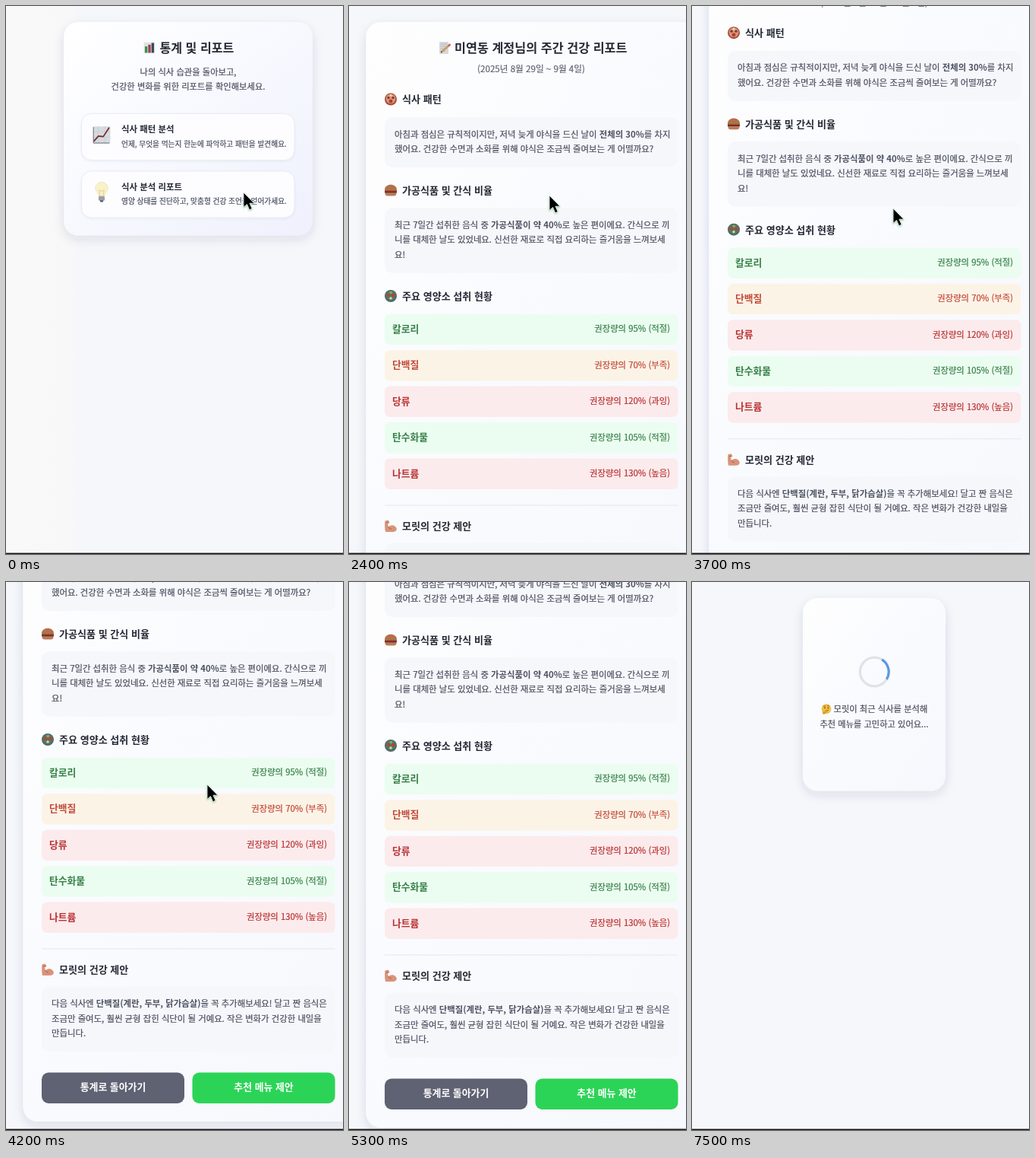
These frames come from a looping animation (444 by 720 pixels, 7.6 s). An HTML page:

```html
<!DOCTYPE html>
<html lang="ko">
<head>
<meta charset="utf-8">
<style>
html, body { margin: 0; width: 100%; height: 100%; overflow: hidden; background: #f5f7fb; }
svg { display: block; width: 444px; height: 720px; }
text { font-family: 'Noto Sans CJK KR', 'Noto Sans CJK', sans-serif; font-weight: 500; white-space: pre; stroke-width: .24px; }
.b { font-weight: 700; stroke-width: 0; }
</style>
</head>
<body>
<svg id="stage" viewBox="0 0 444 720" xmlns="http://www.w3.org/2000/svg"></svg>
<script>
const LOOP = 7600;
const INK = '#262a36', BODY = '#4d5262';

// A hairline stroke gives regular text its medium weight.
const text = (x, mid, str, size, fill = BODY, extra = '') =>
  `<text x="${x}" y="${(mid + size * 0.38).toFixed(2)}" font-size="${size}" fill="${fill}" stroke="${fill}" ${extra}>${str}</text>`;
const bold = 'class="b"', center = 'text-anchor="middle"', right = 'text-anchor="end"';
const strong = s => `<tspan class="b">${s}</tspan>`;
const rect = (x, y, w, h, r, fill, extra = '') =>
  `<rect x="${x}" y="${y}" width="${w}" height="${h}" rx="${r}" fill="${fill}" ${extra}/>`;
const path = (d, fill, extra = '') => `<path d="${d}" fill="${fill}" ${extra}/>`;
const line = (d, stroke, width) => path(d, 'none', `stroke="${stroke}" stroke-width="${width}" stroke-linecap="round" stroke-linejoin="round"`);
const dot = (x, y, r, fill) => `<circle cx="${x}" cy="${y}" r="${r}" fill="${fill}"/>`;

// Icons are drawn in a 16 x 16 box around the origin.
const icons = {
  bars: rect(-8, -8, 16, 16, 1, '#dfe2e4') + rect(-6.5, -2, 3.6, 9, 0, '#3f8a55') +
    rect(-1.8, -4.5, 3.6, 11.5, 0, '#a34142') + rect(2.9, -7, 3.6, 14, 0, '#37495e'),
  trend: rect(-8, -8, 16, 16, 0.8, '#d5dbde') + line('M-8-3H8M-8 2H8M-3-8V8M3-8V8', '#c2cbd0', 0.4) +
    line('M-7 5.5L-3 1L1.5 1.5L6.8-6.5', '#7d2630', 1.2) + line('M-7.6-7V7.4H7', '#5c6268', 0.6),
  bulb: path('M-2.6 3C-2.6 0-5.4-.7-5.4-3.8A5.4 5 0 0 1 5.4-3.8C5.4-.7 2.6 0 2.6 3Z', '#f8f2c8', 'stroke="#ebe4bd" stroke-width=".5"') +
    line('M-1.5 2.5L-2-2L0-1L2-2L1.5 2.5', '#d9c47c', 0.5) + rect(-2.6, 3, 5.2, 4, 1, '#9b9fa3') + rect(-1.4, 6.6, 2.8, 1.5, 0.7, '#51565b'),
  memo: rect(-7, -8, 12, 16, 1, '#d6d9de') + line('M-5-5H3M-5-2H3M-5 1H3M-5 4H1', '#9ea6b1', 0.7) +
    line('M-3 4.5L5.5-3', '#d59a55', 2.6) + line('M5.5-3L6.8-4.2', '#c76a6c', 2.6) + dot(-4.2, 5.5, 0.9, '#453a35'),
  meal: dot(0, 0, 8, '#a8493b') + dot(0, -0.6, 6.4, '#d99478') + dot(-3, -2, 1.6, '#6a3b30') +
    dot(3, -2, 1.6, '#6a3b30') + dot(0, 2.6, 2.4, '#b03c35') + dot(0, -5, 1.5, '#f1d9b7'),
  burger: path('M-8-1C-8-10 8-10 8-1Z', '#b96d49') + rect(-8, -1.6, 16, 2.2, 1, '#7d8f4c') +
    rect(-8, 0.2, 16, 3, 1.2, '#5d2f28') + rect(-8, -0.5, 16, 1.5, 0.6, '#c7443a') +
    path('M-7.6 3.2H7.6C7.6 6 6 7 4 7H-4C-6 7-7.6 6-7.6 3.2Z', '#bd7a54'),
  salad: dot(0, 0, 8, '#4f666c') + dot(0, -0.5, 6.5, '#4f7d5b') + dot(-3, -1, 2.4, '#b2443f') +
    dot(3.4, -1, 2.4, '#b2443f') + dot(0, 3, 1.8, '#d3d1b8') + dot(0.3, -4.4, 1.8, '#86a96c'),
  arm: path('M-7.5-7L-3.5-8L-1.5-5L-4-3L-3 1C0-2.5 6-2 7.8 3C8 6 6 7.5 2 7.5H-7C-8 3-8-2-7.5-7Z', '#d9937a') +
    line('M-3 1C-2 3-1 3.4 .5 3.4', '#a3573f', 0.9) + line('M-6-4.6H-3', '#a3573f', 0.7),
  think: dot(0, -0.3, 7.6, '#f0c146') + dot(-2.4, -2, 1, '#5a3a1c') + dot(2.8, -2, 1, '#5a3a1c') +
    line('M-4.3-4.6L-1.5-4.8M1.5-5.3Q3.3-6.4 4.8-4.8M-1 2.4L3 1.7', '#76501f', 0.9) +
    path('M-5.6 7.4C-6.6 4-5 3-4 4L1.5 2.8C3 3 2.4 4.4 1 4.6L-.6 5C-.6 7.6-3.6 8.8-5.6 7.4Z', '#e09a2c')
};
const icon = (name, x, y, scale = 1) => `<g transform="translate(${x} ${y}) scale(${scale})">${icons[name]}</g>`;

const defs = `<defs>
  <linearGradient id="statsBg"><stop offset="0" stop-color="#f9f9f9"/><stop offset=".19" stop-color="#f8f8f9"/>
    <stop offset=".22" stop-color="#f6f7fb"/><stop offset="1" stop-color="#f5f7fb"/></linearGradient>
  <linearGradient id="statsCard" x1="0" y1="0" x2="1" y2="1"><stop offset="0" stop-color="#fff"/>
    <stop offset=".4" stop-color="#f9faff"/><stop offset="1" stop-color="#eef1fc"/></linearGradient>
  <linearGradient id="softCard" x1="0" y1="0" x2="1" y2="1"><stop offset="0" stop-color="#fefefe"/>
    <stop offset=".4" stop-color="#fafbfe"/><stop offset="1" stop-color="#f7f8fd"/></linearGradient>
  <filter id="shadow" x="-20%" y="-20%" width="140%" height="140%">
    <feDropShadow dx="0" dy="5" stdDeviation="7" flood-color="#303a55" flood-opacity=".12"/></filter>
  <filter id="thin" x="-10%" y="-20%" width="120%" height="150%">
    <feDropShadow dx="0" dy="1" stdDeviation="1.5" flood-color="#303a55" flood-opacity=".07"/></filter>
  <filter id="glow" x="-60%" y="-60%" width="220%" height="220%">
    <feDropShadow dx="0" dy="1" stdDeviation="1.3" flood-color="#46a868" flood-opacity=".6"/></filter>
</defs>`;

const option = (y, name, title, note) =>
  rect(99.5, y, 280.5, 61, 13, '#fdfdff', 'stroke="#e9ecf4" filter="url(#thin)"') +
  icon(name, 126, y + 28, name === 'trend' ? 1.42 : 1.55) +
  text(152, y + 20.5, title, 11.45, INK, bold) + text(152, y + 39.5, note, 9.7);

const statsPage = rect(0, 0, 444, 720, 0, 'url(#statsBg)') +
  rect(76, 21, 328, 280.5, 20, 'url(#statsCard)', 'filter="url(#shadow)"') +
  icon('bars', 189, 55, 0.92) + text(202.5, 55, '통계 및 리포트', 16.1, INK, bold) +
  text(240, 86.5, '나의 식사 습관을 돌아보고,', 11.3, BODY, center) +
  text(240, 105.5, '건강한 변화를 위한 리포트를 확인해보세요.', 11.3, BODY, center) +
  option(141.5, 'trend', '식사 패턴 분석', '언제, 무엇을 먹는지 한눈에 파악하고 패턴을 발견해요.') +
  option(217, 'bulb', '식사 분석 리포트', '영양 상태를 진단하고, 맞춤형 건강 조언을 얻어가세요.');

const heading = (y, name, title) => icon(name, 55, y) + text(70, y, title, 13.05, INK, bold);
const panel = (y, lines) => rect(47, y, 386.5, 27 + 19.5 * lines.length, 10, '#f6f7fb') +
  lines.map((s, i) => text(60, y + 22.3 + i * 19.5, s, 11.4)).join('');

const tones = { good: ['#ebfdf0', '#38814a'], low: ['#fcf3e7', '#c24a38'], high: ['#fcebec', '#b93436'] };
const nutrients = [
  ['칼로리', '95% (적절)', 'good'], ['단백질', '70% (부족)', 'low'], ['당류', '120% (과잉)', 'high'],
  ['탄수화물', '105% (적절)', 'good'], ['나트륨', '130% (높음)', 'high']
];
const nutrientRow = ([name, value, tone], i) => {
  const y = 404.7 + i * 47.45, [bg, fg] = tones[tone];
  return rect(47, y, 386.5, 40.5, 7, bg) + text(57, y + 19.3, name, 12.8, fg, bold) +
    text(423, y + 19.3, '권장량의 ' + value, 11.35, fg, right);
};
const button = (x, label, fill) => rect(x, 818.5, 188, 40.5, 9, fill) +
  text(x + 94, 837, label, 12.9, '#fff', `${bold} ${center}`);

const reportPage = rect(22.5, 21, 436, 862, 20, 'url(#softCard)', 'filter="url(#shadow)"') +
  icon('memo', 126, 55) + text(139, 55, '미연동 계정님의 주간 건강 리포트', 16.25, INK, bold) +
  text(240, 82.5, '(2025년 8월 29일 ~ 9월 4일)', 11.6, '#626777', center) +
  heading(122.5, 'meal', '식사 패턴') +
  panel(146, [`아침과 점심은 규칙적이지만, 저녁 늦게 야식을 드신 날이 ${strong('전체의 30%')}를 차지`,
    '했어요. 건강한 수면과 소화를 위해 야식은 조금씩 줄여보는 게 어떨까요?']) +
  heading(242.5, 'burger', '가공식품 및 간식 비율') +
  panel(265.3, [`최근 7일간 섭취한 음식 중 ${strong('가공식품이 약 40%')}로 높은 편이에요. 간식으로 끼`,
    '니를 대체한 날도 있었네요. 신선한 재료로 직접 요리하는 즐거움을 느껴보세', '요!']) +
  heading(381, 'salad', '주요 영양소 섭취 현황') + nutrients.map(nutrientRow).join('') +
  rect(47, 655.5, 386.5, 1, 0, '#e5e7ee') +
  heading(683.5, 'arm', '모릿의 건강 제안') +
  panel(705.5, [`다음 식사엔 ${strong('단백질(계란, 두부, 닭가슴살)')}을 꼭 추가해보세요! 달고 짠 음식은`,
    '조금만 줄여도, 훨씬 균형 잡힌 식단이 될 거예요. 작은 변화가 건강한 내일을', '만듭니다.']) +
  button(47, '통계로 돌아가기', '#5f6272') + button(245.5, '추천 메뉴 제안', '#2bd456');

const loadingPage = rect(146, 21, 188, 253.5, 20, 'url(#softCard)', 'filter="url(#shadow)"') +
  `<circle cx="240.3" cy="118" r="18.9" fill="none" stroke="#dfe2e8" stroke-width="3.2"/>
   <g id="spinner">${path('M226.94 104.64A18.9 18.9 0 0 1 253.66 104.64', 'none', 'stroke="#5b98e6" stroke-width="3.2"')}</g>` +
  icon('think', 177, 167, 0.84) + text(186.5, 167, '모릿이 최근 식사를 분석해', 11.3) +
  text(240, 186.5, '추천 메뉴를 고민하고 있어요...', 11.25, BODY, center);

const stage = document.getElementById('stage');
stage.innerHTML = defs + rect(0, 0, 444, 720, 0, '#f5f7fb') +
  `<g id="stats">${statsPage}</g><g id="report">${reportPage}</g><g id="loading">${loadingPage}</g>` +
  `<g id="cursor" filter="url(#glow)">${path('M0 0V19.5L4.5 15.5L7.7 22.8L11.2 21.2L8 14.2H14Z', '#000', 'stroke="#e4f2e8" stroke-width=".9" stroke-linejoin="round"')}</g>` +
  rect(0, 718.6, 444, 1.4, 0, '#111');
const [stats, report, loading, spinner, cursor] =
  ['stats', 'report', 'loading', 'spinner', 'cursor'].map(id => document.getElementById(id));

// Eases between [time, ...values] stops.
function track(stops, t) {
  const next = stops.findIndex(s => s[0] > t);
  if (next === 0) return stops[0].slice(1);
  if (next < 0) return stops[stops.length - 1].slice(1);
  const a = stops[next - 1], b = stops[next];
  const u = (t - a[0]) / (b[0] - a[0]), k = u * u * (3 - 2 * u);
  return a.slice(1).map((v, i) => v + (b[i + 1] - v) * k);
}

const scrollStops = [[3250, 0], [4150, 174], [4350, 174], [4800, 166]];
const cursorStops = [[0, 313, 245], [800, 290, 262], [1600, 264, 250], [2450, 264, 249], [3100, 265, 266],
  [4600, 265, 266], [5500, 343, 668], [5900, 347, 674], [6500, 347, 674], [6900, 382, 684]];
const show = (node, on) => node.setAttribute('visibility', on ? 'visible' : 'hidden');

function draw(t) {
  show(stats, t < 2000);
  show(report, t >= 2000 && t < 5900);
  show(loading, t >= 5900);
  show(cursor, t < 4700 || (t >= 5500 && t < 6900));
  report.setAttribute('transform', `translate(0 ${-track(scrollStops, t)[0]})`);
  cursor.setAttribute('transform', `translate(${track(cursorStops, t).join(' ')})`);
  spinner.setAttribute('transform', `rotate(${26 + (t - 6400) * 360 / 965} 240.3 118)`);
}

const start = performance.now();
function frame() {
  draw((performance.now() - start) % LOOP);
  requestAnimationFrame(frame);
}
draw(0);
requestAnimationFrame(frame);
</script>
</body>
</html>
```
